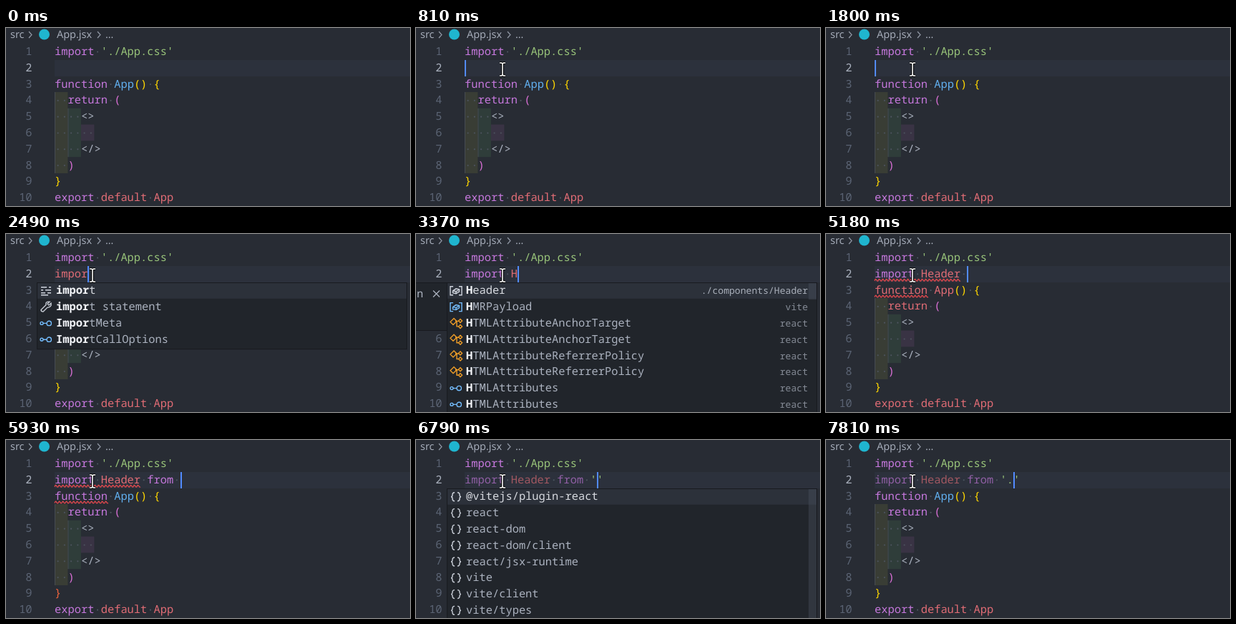
An HTML page that plays this animation: 565x250 px, repeating every 8000 ms.

```html
<!DOCTYPE html>
<html lang="en">
<head>
<meta charset="utf-8">
<title>Typing an import</title>
<style>
html, body { margin: 0; width: 100%; height: 100%; overflow: hidden; background: #282c34; }
svg { display: block; }
text { font: 15.4px "Noto Sans Mono", monospace; white-space: pre; text-rendering: geometricPrecision; }
.ui { font: 14.5px "Open Sans", "Noto Sans", sans-serif; }
.from { font-size: 13.1px; }
.icon { fill: none; stroke-width: 1.4; }
.hit { font-weight: 700; fill: #f2f4f8; }
</style>
</head>
<body>
<svg id="stage" width="565" height="250" viewBox="0 0 565 250"></svg>
<script>
const stage = document.getElementById('stage');
const LOOP = 8000, LEFT = 68, CW = 9.24, LH = 22.8;
const PURPLE = '#c678dd', RED = '#e06c75', GREEN = '#98c379', BLUE = '#61afef',
  GOLD = '#ffd700', ORCHID = '#da70d6', GREY = '#abb2bf', CARET = '#528bff';

const midY = line => 33 + LH * (line - 1);
const colX = col => LEFT + CW * col;
const escape = s => s.replace(/&/g, '&amp;').replace(/</g, '&lt;');
const text = (x, y, s, fill, attrs = '') => `<text x="${x}" y="${y}" fill="${fill}" ${attrs}>${s}</text>`;
const rect = (x, y, w, h, fill, attrs = '') => `<rect x="${x}" y="${y}" width="${w}" height="${h}" fill="${fill}" ${attrs}/>`;

// Suggestion rows: icon, label, origin
const rows = s => s.split(';').map(r => r.split(','));
const handlers = 'class,TouchEventHandler,react;class,TouchEventHandler,react;var,hy*d*rate,react-dom;var,hy*d*rate,react-dom;class,WheelEventHandler,react;class,WheelEventHandler,react';
const lists = {
  i: rows('key,if,;key,import,;key,in,;key,instanceof,;face,Image,;face,ImageData,;var,isFinite,;var,isNaN,'),
  im: rows('key,import,;key,implements,;face,Image,;face,ImageBitmap,;face,ImageData,;face,ImportMeta,;tool,imp,;tool,import statement,'),
  imp: rows('key,import,;tool,import statement,;face,ImportMeta,;face,ImportCallOptions,'),
  H: rows('var,Header,./components/Header;var,HMRPayload,vite;class,HTMLAttributeAnchorTarget,react;class,HTMLAttributeAnchorTarget,react;class,HTMLAttributeReferrerPolicy,react;class,HTMLAttributeReferrerPolicy,react;face,HTMLAttributes,react;face,HTMLAttributes,react'),
  He: rows('var,Header,./components/Header;face,HTMLAttributes,react;face,HTMLAttributes,react;class,TouchEventHandler,react;class,TouchEventHandler,react;class,WheelEventHandler,react;class,WheelEventHandler,react;face,HTMLElement,'),
  Head: rows('var,Header,./components/Header;' + handlers + ';tool,Head,'),
  Header: rows('var,Header,./components/Header;face,Headers,;class,TouchEventHandler,react;class,TouchEventHandler,react;class,WheelEventHandler,react;class,WheelEventHandler,react;face,HeadersInit,;tool,Header,'),
  from: rows('key,from,'),
  paths: rows('mod,@vitejs/plugin-react,;mod,react,;mod,react-dom,;mod,react-dom/client,;mod,react/jsx-runtime,;mod,vite,;mod,vite/client,;mod,vite/types,')
};

// Each entry changes part of the state from its time on
const script = [
  [0, { typed: '', caret: 0, list: '' }],
  [810, { caret: 1 }], [1340, { caret: 0 }], [1800, { caret: 1 }],
  [1930, { typed: 'i' }], [2000, { list: 'i' }], [2060, { typed: 'im', list: 'im' }],
  [2200, { typed: 'imp', list: 'imp' }], [2270, { typed: 'impo' }],
  [2490, { typed: 'impor' }], [2610, { typed: 'import', broken: 1 }],
  [2830, { typed: 'import ' }], [2950, { list: '' }],
  [3230, { typed: 'import H' }], [3300, { list: 'H' }], [3370, { pane: 1 }],
  [3710, { typed: 'import He' }], [3780, { list: 'He' }], [3850, { typed: 'import Hea' }],
  [4050, { typed: 'import Head' }], [4120, { list: 'Head' }], [4450, { wavy: 10 }],
  [4650, { typed: 'import Heade' }], [4720, { list: 'Header' }],
  [4780, { typed: 'import Header' }], [4850, { wavy: 13 }],
  [5180, { typed: 'import Header ', list: '', pane: 0 }],
  [5310, { typed: 'import Header f' }], [5380, { list: 'from' }],
  [5450, { typed: 'import Header fr' }], [5510, { typed: 'import Header fro' }],
  [5640, { typed: 'import Header from' }],
  [5780, { typed: 'import Header from ', list: '', broken: 0, stray: 1 }],
  [5930, { known: 1 }], [6260, { caret: 0 }], [6390, { wavy: 0, stray: 0, dim: 1 }],
  [6720, { typed: "import Header from '", caret: 1 }], [6790, { list: 'paths' }],
  [7260, { caret: 0 }], [7610, { typed: "import Header from '.", caret: 1, list: '' }]
];
const stateAt = t => Object.assign({}, ...script.filter(e => e[0] <= t).map(e => e[1]));

// Tokens are [text, colour]; spaces become faint dots
function codeLine(line, tokens) {
  let col = 0, out = '';
  for (const [s, fill, opacity = 1] of tokens) {
    for (const part of s.split(/( )/)) {
      if (part === ' ') out += `<circle cx="${colX(col + .5)}" cy="${midY(line) + .5}" r="1.1" fill="#4d545f"/>`;
      else if (part) out += text(colX(col), midY(line) + 5, escape(part), fill, `opacity="${opacity}"`);
      col += part.length;
    }
  }
  return out;
}

function wave(line, cols) {
  const n = Math.round(cols * CW / 5);
  return `<path d="M${LEFT} ${midY(line) + 10}${'q1.25-4 2.5-1.5t2.5 1.5'.repeat(n)}" fill="none" stroke="#e5484d" stroke-width="1.3"/>`;
}

function typedLine(s) {
  const [head, ...tail] = s.typed.split("'");
  const color = w => w === 'import' || (w === 'from' && s.known) ? PURPLE : RED;
  const tokens = head.split(/( )/).map(w => [w, color(w), s.dim ? .65 : 1]);
  if (tail.length) tokens.push(["'" + tail[0] + "'", GREEN]);
  return codeLine(2, tokens);
}

function editor(s) {
  const word = s.broken ? RED : PURPLE;
  const top = line => midY(line) - LH / 2;
  const band = (col, a, b, fill) => rect(colX(col), top(a), 2 * CW, LH * (b - a + 1), fill, 'opacity=".08"');
  const guide = (col, a, b) => rect(colX(col), top(a), 1, LH * (b - a + 1), '#454b54');
  let out = rect(LEFT, 45, 497, 23, '#2c313c')
    + band(0, 4, 8, '#ffff40') + band(2, 5, 7, '#7fff7f') + band(4, 6, 6, '#ff7fff')
    + guide(0, 4, 8) + guide(2, 5, 7);
  for (let n = 1; n <= 10; n++)
    out += text(36.6, midY(n) + 5, n, n === 2 ? GREY : '#5b6474', 'text-anchor="end"');
  out += codeLine(1, [['import ', PURPLE], ["'./App.css'", GREEN]])
    + typedLine(s)
    + codeLine(3, [['function ', word], ['App', s.broken ? RED : BLUE], ['() {', GOLD]])
    + codeLine(4, [['  return ', word], ['(', ORCHID]])
    + codeLine(5, [['    <>', GREY]])
    + codeLine(6, [['      ', GREY]])
    + codeLine(7, [['    </>', GREY]])
    + codeLine(8, [['  ', GREY], [')', ORCHID]])
    + codeLine(9, [['}', s.stray ? '#f0643c' : GOLD]])
    + codeLine(10, [['export ', word], ['default App', RED]]);
  if (s.wavy) out += wave(2, s.wavy) + wave(3, 8);
  if (s.caret) out += rect(Math.round(colX(s.typed.length)), 45, 2, 23, CARET);
  return out;
}

function breadcrumb() {
  const arrow = x => `<path d="M${x} 5l4 4.5-4 4.5" fill="none" stroke="#9299a6" stroke-width="1.2"/>`;
  return text(6, 14, 'src', GREY, 'class="ui"') + arrow(32)
    + '<circle cx="53.5" cy="9" r="7.5" fill="#1fb5cf"/>'
    + text(71, 14, 'App.jsx', GREY, 'class="ui"') + arrow(128)
    + text(139, 14, '…', GREY, 'class="ui"');
}

const icons = {
  var: ['#75beff', 'M-4-6h-4V6h4M4-6h4V6h-4M-4.5 0L0-3l4.5 1v3L0 4l-4.5-1zl4.500 1 4.500-3M0 1v3'],
  class: ['#ee9d28', 'M-8-2l5-5 4 4-5 5zM-1-3h4.500M1-3v7.500h2.500M6-6l2.500 2.500L6-1 3.500-3.500zM6 2l2.500 2.500L6 7 3.500 4.500z'],
  face: ['#75beff', 'M-8 0a2 2 0 1 0 4 0a2 2 0 1 0-4 0M-4 0h5M1 0a3.200 3.200 0 1 0 6.400 0a3.200 3.200 0 1 0-6.400 0'],
  key: ['#c5cad3', 'M-7-5h8M4-5h3M-7-1h3M-1-1h8M-7 3h6M2 3h5M-7 6h10'],
  tool: ['#c5cad3', 'M-7 4L0-3q-1-4 3-4.500l2 0-3 3 2 2 3-3q1 5-4 6l-1 0-6 6q-3 0-3-2.500z'],
  mod: ['#c5cad3', 'M-2-6q-3 0-3 3t-2 3q2 0 2 3t3 3M2-6q3 0 3 3t2 3q-2 0-2 3t-3 3']
};

// Emphasise the letters of the query in their order
function label(name, query) {
  if (name.includes('*'))
    return name.split('*').map((p, i) => i % 2 ? `<tspan class="hit">${p}</tspan>` : p).join('');
  let k = 0;
  return [...name].map(c => {
    if (k >= query.length || c.toLowerCase() !== query[k].toLowerCase()) return c;
    k++;
    return `<tspan class="hit">${c}</tspan>`;
  }).join('');
}

function popup(s) {
  const items = lists[s.list];
  if (!items) return '';
  const query = s.typed.split(/[ ']/).pop();
  let out = '';
  if (s.pane) out += rect(-2, 68.5, 46, 67, '#21252b', 'stroke="#181a1f"')
    + text(1, 89, 'n', GREY)
    + '<path d="M24 79.500l9 9m0-9l-9 9" stroke="#abb2bf" stroke-width="1.300"/>';
  out += rect(43.5, 68.5, 517, items.length * LH + 2, '#21252b', 'stroke="#181a1f"')
    + rect(44, 69, 516, LH - 1, '#2c313a');
  if (items.length === 8)
    out += rect(549, 69, 11, s.list === 'H' || s.list === 'i' ? 23 : 181, '#4e5666', 'opacity=".35"');
  items.forEach(([kind, name, origin], i) => {
    const y = 79.3 + i * LH, [color, d] = icons[kind];
    out += `<path class="icon" transform="translate(56 ${y + .5})" d="${d}" stroke="${i ? color : '#d0d5de'}"/>`
      + text(70, y + 5, label(name, query), i ? GREY : '#d7dae0')
      + text(548, y + 5, origin, i ? '#858b96' : '#a9afba', 'class="from" text-anchor="end"');
  });
  return out;
}

function pointer(t) {
  if (t < 190) return '';
  const step = Math.min(6, Math.floor((t - 190) / 70)) / 6;
  const left = (1 - step) ** 2;
  const d = 'M-4-9h2.500L0-8l1.500-1H4M0-8V8M-4 9h2.500L0 8l1.500 1H4';
  return `<g transform="translate(${121 + 242 * left} ${58 + 157 * left})" fill="none">`
    + `<path d="${d}" stroke="#000" stroke-width="3.600"/><path d="${d}" stroke="#fff" stroke-width="1.600"/></g>`;
}

let shown = '';
function frame(now) {
  const t = now % LOOP, s = stateAt(t);
  const picture = breadcrumb() + editor(s) + popup(s) + pointer(t);
  if (picture !== shown) stage.innerHTML = shown = picture;
  requestAnimationFrame(frame);
}
frame(0);
</script>
</body>
</html>
```
